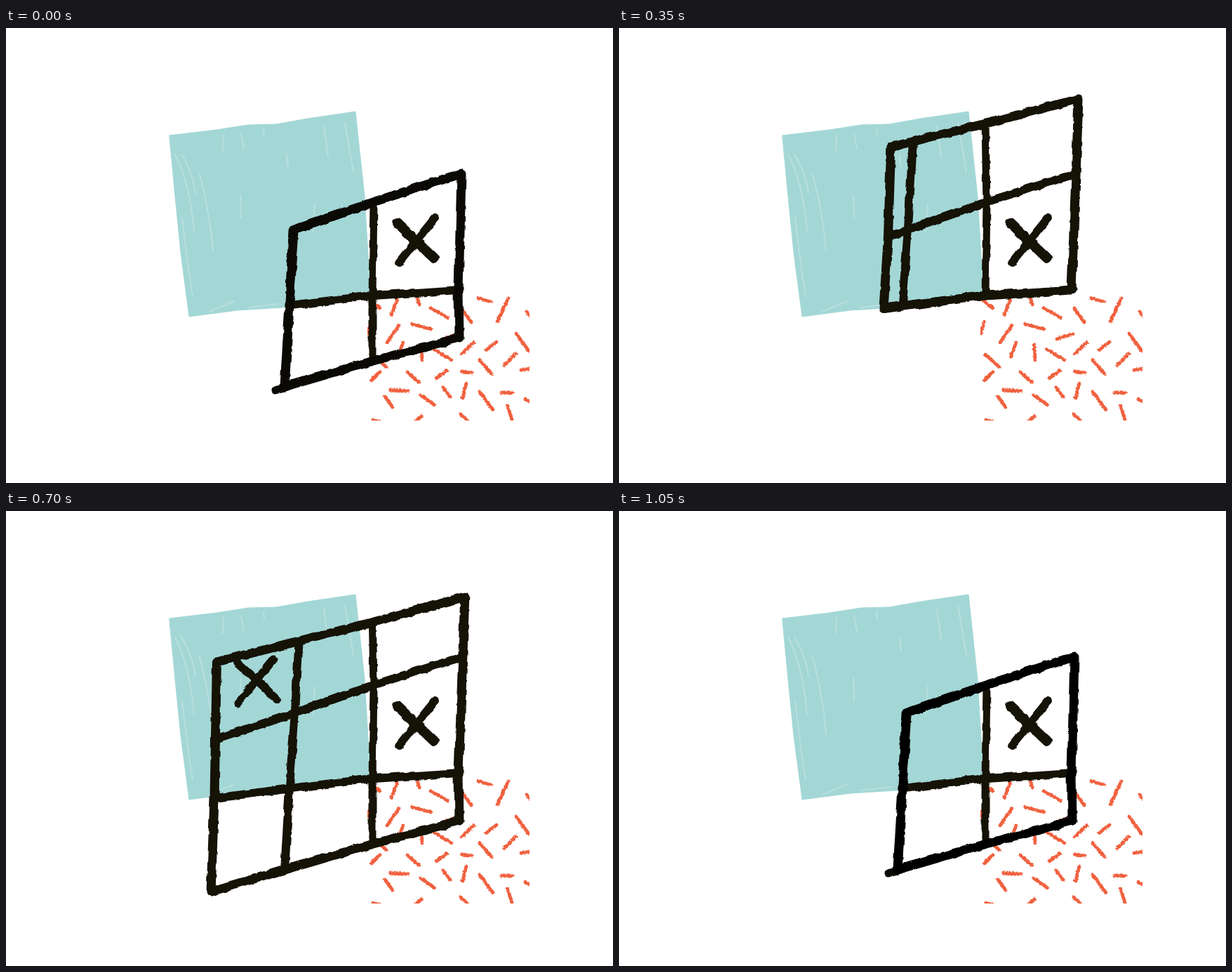
Animation of 865 by 648 pixels, one loop 1100 ms. Source, as an HTML page without scripts:

```html
<!DOCTYPE html>
<html lang="en">
<head>
<meta charset="utf-8">
<title>Sliding grid</title>
<style>
  html, body { margin: 0; width: 100%; height: 100%; overflow: hidden; background: #fff; }
  svg { display: block; width: 100vw; height: 100vh; }
  path { fill: none; stroke-linecap: round; stroke-linejoin: round; }

  .sheet { fill: #a3d7d6; stroke: #a3d7d6; stroke-width: 1; }
  .streaks { stroke: #fff; stroke-width: 2; opacity: .22; }
  .dashes { stroke: #f0613f; stroke-width: 4.8; }
  .ink { stroke: #151206; stroke-width: 12; }
  .thin { stroke-width: 11; }
  .bold { stroke-width: 14; }

  .rim { animation: slide 1100ms infinite; }
  .edge { stroke: #151206; stroke-width: 13; animation: slide 1100ms infinite, tone 1100ms step-end infinite; }
  .nub { stroke: #0b0904; stroke-width: 9; animation: nub 1100ms step-end infinite; }

  /* points: top left, top, top right, right, bottom right, bottom, bottom left, left */
  @keyframes slide {
    0% {
      d: path("M408 287L522 247L648 206L644 372L645 441L522 473L396 510L403 393Z");
      animation-timing-function: linear(0 0% 33.3%, .3 33.3% 66.6%, .75 66.6% 100%);
    }
    13.63% {
      d: path("M408 287L522 247L648 206L644 371L645 372L522 380L402 395L403 393Z");
      animation-timing-function: linear(0 0% 33.3%, .4 33.3% 66.6%, .86 66.6% 100%);
    }
    27.27% {
      d: path("M416 162L522 135L654 100L644 371L645 372L522 380L402 395L410 287Z");
      animation-timing-function: linear(0 0% 25%, .25 25% 50%, .65 50% 75%, .93 75% 100%);
    }
    45.45% {
      d: path("M299 187L522 135L654 100L644 371L645 372L522 380L298 409L300 323Z");
      animation-timing-function: linear(0 0% 33.3%, .4 33.3% 66.6%, .81 66.6% 100%);
    }
    59.09% {
      d: path("M299 187L522 135L654 100L644 372L645 441L522 473L291 541L296 408Z");
      animation-timing-function: linear(0 0% 25%, .2 25% 50%, .58 50% 75%, .86 75% 100%);
    }
    77.27% {
      d: path("M301 322L522 247L648 206L644 372L645 441L522 473L291 541L296 408Z");
      animation-timing-function: linear(0 0% 25%, .2 25% 50%, .58 50% 75%, .88 75% 100%);
    }
    95.45%, 100% {
      d: path("M408 287L522 247L648 206L644 372L645 441L522 473L396 510L403 393Z");
    }
  }
  @keyframes tone {
    0% { stroke: #0b0904; }
    4.54% { stroke: #151206; }
    95.45%, 100% { stroke: #000; }
  }
  @keyframes nub {
    0% { opacity: 1; }
    4.54% { opacity: 0; }
    95.45%, 100% { opacity: 1; }
  }
</style>
</head>
<body>
<svg viewBox="0 0 865 648">
  <defs>
    <clipPath id="inside"><path class="rim" d="M408 287L522 247L648 206L644 372L645 441L522 473L396 510L403 393Z"/></clipPath>
    <clipPath id="patch"><rect x="515" y="380" width="231" height="179"/></clipPath>
    <filter id="rough" filterUnits="userSpaceOnUse" x="0" y="0" width="865" height="648" color-interpolation-filters="sRGB">
      <feTurbulence baseFrequency=".2" numOctaves="2" seed="4"/>
      <feDisplacementMap in="SourceGraphic" scale="3" xChannelSelector="R" yChannelSelector="G"/>
    </filter>
    <filter id="hand" filterUnits="userSpaceOnUse" x="0" y="0" width="865" height="648" color-interpolation-filters="sRGB">
      <feTurbulence baseFrequency=".035" numOctaves="2" seed="7"/>
      <feDisplacementMap in="SourceGraphic" scale="4" xChannelSelector="R" yChannelSelector="G"/>
    </filter>
  </defs>

  <path class="sheet" d="M233 153L300 145L345 138L385 137L430 129L498 119L511 240L517 340L519 381L395 398L330 402L261 411L249 320L241 240Z"/>
  <g class="streaks">
    <path d="M241 180Q262 220 268 290M250 180Q266 205 270 235M276 208Q290 260 295 318M251 270Q259 340 266 382"/>
    <path d="M310 152L309 174M335 150L339 172M367 143L368 154M453 140L459 183M483 135L495 205M334 238L335 270M440 250L437 290M400 180L402 198"/>
    <path d="M290 404L325 389M345 398L388 393"/>
  </g>

  <g clip-path="url(#patch)">
    <g class="dashes" filter="url(#rough)">
      <path d="M519 388L532 398M557 386L548 408M585 384L589 394M604 398L629 412M648 398L662 418M672 384L691 389M715 384L700 417M741 403L750 415"/>
      <path d="M520 418L515 434M559 423L542 447M578 421L605 428M623 442L646 435M726 434L744 459M565 447L558 467M591 450L592 472M609 457L634 472M666 447L649 463M698 446L683 458"/>
      <path d="M726 463L709 480M521 464L541 482M674 472L691 492M733 486L750 484M532 489L520 501M571 489L588 504M628 487L612 498M649 489L663 490M622 511L632 524M655 505L650 526"/>
      <path d="M547 515L572 516M539 524L550 539M590 522L610 536M674 517L693 543M705 519L721 519M739 528L750 533M714 538L720 557M522 557L535 561M591 552L580 562M647 549L660 562"/>
    </g>
  </g>

  <g filter="url(#hand)">
    <g clip-path="url(#inside)">
      <path class="ink" d="M300 323L410 287L522 247L648 207"/>
      <path class="ink" d="M296 408L405 394L522 380L645 372"/>
      <path class="ink" d="M418 160L411 285L403 392L396 512"/>
      <path class="ink thin" d="M521 133L523 250L521 380L521 474"/>
      <path class="ink" d="M329 216L385 267"/>
      <path class="ink thin" d="M381 210L329 273"/>
    </g>
    <path class="ink bold" d="M557 277L609 327"/>
    <path class="ink" d="M610 270L559 333"/>
    <path class="nub" d="M383 515L400 511"/>
    <path class="edge" d="M408 287L522 247L648 206L644 372L645 441L522 473L396 510L403 393Z"/>
  </g>
</svg>
</body>
</html>
```
